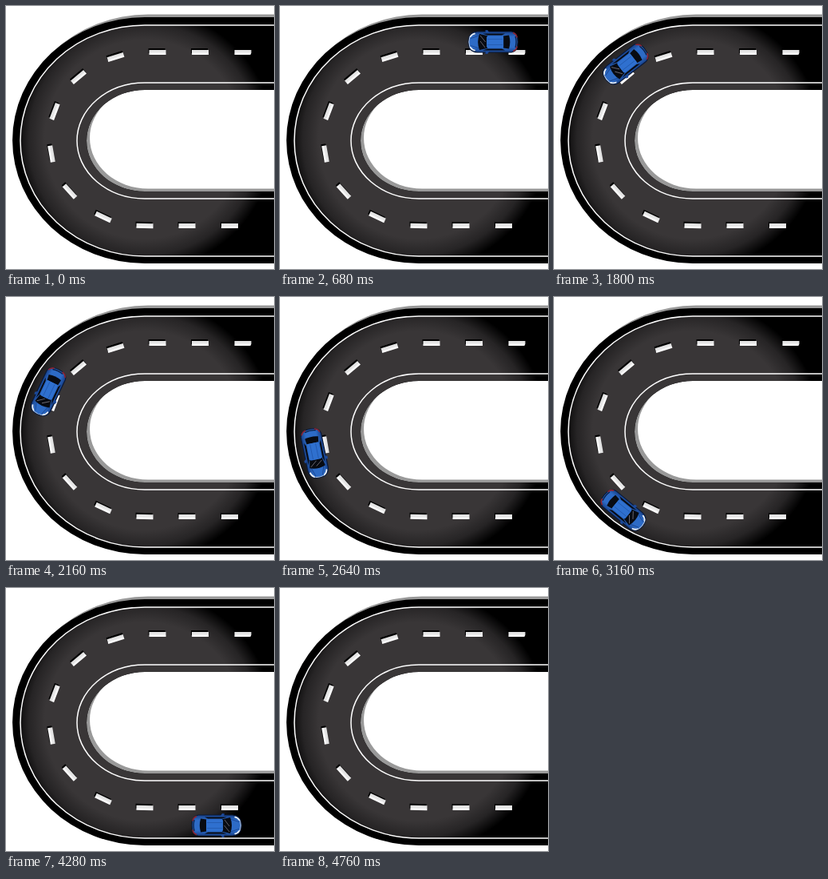
Recreate the animation shown at these times as an HTML page. Size 336 by 329 pixels, loop 4800 ms.

```html
<!DOCTYPE html>
<html lang="en">
<head>
<meta charset="utf-8">
<title>Car on a bend</title>
<style>
  html, body { margin: 0; width: 100%; height: 100%; overflow: hidden; background: #fff; }
  svg { position: absolute; left: 0; top: 0; overflow: visible; }
  .car {
    position: absolute; left: 0; top: 0; width: 0; height: 0;
    offset-path: path("M378.7 45H172A131 126 0 0 0 172 297H349.4");
    offset-rotate: auto;
    animation: drive 4.8s steps(120) infinite, show 4.8s step-end infinite;
  }
  @keyframes drive { from { offset-distance: 0%; } to { offset-distance: 100%; } }
  @keyframes show { 0% { visibility: visible; } 99.16%, 100% { visibility: hidden; } }
</style>
</head>
<body>
<svg width="336" height="329" viewBox="0 0 336 329">
  <defs>
    <radialGradient id="asphalt" gradientUnits="userSpaceOnUse" cx="173" cy="167" r="168">
      <stop offset=".74" stop-color="#393637"/>
      <stop offset=".86" stop-color="#262425"/>
      <stop offset=".97" stop-color="#000"/>
    </radialGradient>
    <path id="road" d="M340 14H174A166 154 0 0 0 174 322H340V232H174A73 63.5 0 0 1 174 105H340Z"/>
    <path id="lane" d="M340 24H174A156 144.5 0 0 0 174 313H340V232H174A73 63.5 0 0 1 174 105H340Z"/>
    <g id="dash">
      <rect x="-10.5" y="-3" width="21" height="6"/>
    </g>
    <g id="dashes">
      <use href="#dash" transform="translate(297 58)"/>
      <use href="#dash" transform="translate(243.5 58)"/>
      <use href="#dash" transform="translate(190 58)"/>
      <use href="#dash" transform="translate(137.5 64) rotate(-17)"/>
      <use href="#dash" transform="translate(91 89) rotate(-40)"/>
      <use href="#dash" transform="translate(61 132) rotate(-69)"/>
      <use href="#dash" transform="translate(57 185) rotate(80)"/>
      <use href="#dash" transform="translate(80 232) rotate(48)"/>
      <use href="#dash" transform="translate(122 264) rotate(25)"/>
      <use href="#dash" transform="translate(174 275) rotate(1)"/>
      <use href="#dash" transform="translate(227 275)"/>
      <use href="#dash" transform="translate(280.5 275)"/>
    </g>
    <linearGradient id="paint" x1="0" y1="0" x2="0" y2="1">
      <stop offset="0" stop-color="#e0e0e0"/>
      <stop offset=".45" stop-color="#e6e6e6"/>
      <stop offset=".8" stop-color="#fff"/>
    </linearGradient>
  </defs>
  <use href="#road" x="4" y="-3.5" fill="#999"/>
  <use href="#road"/>
  <use href="#lane" fill="url(#asphalt)"/>
  <g fill="none" stroke="#fff" stroke-width="1.5">
    <path d="M340 24H174A156 144.5 0 0 0 174 313H340"/>
    <path d="M340 96H174A85 72.5 0 0 0 174 241H340"/>
  </g>
  <use href="#dashes" x="-1" y="-2" fill="#000"/>
  <use href="#dashes" fill="url(#paint)"/>
  <path d="M306 61.5L309 57V62Z"/>
</svg>

<div class="car">
  <svg width="1" height="1">
    <defs>
      <linearGradient id="body" x1="0" y1="0" x2="0" y2="1">
        <stop offset="0" stop-color="#173f87"/>
        <stop offset=".25" stop-color="#2d6bc6"/>
        <stop offset=".75" stop-color="#2d6bc6"/>
        <stop offset="1" stop-color="#173f87"/>
      </linearGradient>
      <g id="side">
        <path d="M5 12L7 15L10 14.5L9 12Z" fill="#1c4a9c"/>
        <path d="M23 11.5Q29 10 30 5L28 6Q26 9 22 10Z" fill="#e8eef5"/>
        <path d="M-30 5.5Q-29.5 10 -25 11.6" fill="none" stroke="#8d2430" stroke-width="1.6"/>
        <path d="M-15 10.6L-11 8.6H7L13 10.6Z" fill="#080b12"/>
        <path d="M17 8L28 4.5" stroke="#1a4690" stroke-width=".9"/>
      </g>
    </defs>
    <path d="M-31 0Q-31 -12 -23 -13H20Q31 -12 31 0Q31 12 20 13H-23Q-31 12 -31 0Z"
          fill="url(#body)" stroke="#0b1a38" stroke-width="1.2"/>
    <path d="M-28 -7Q-30 0 -28 7" fill="none" stroke="#0d2148" stroke-width="1.4"/>
    <use href="#side"/>
    <use href="#side" transform="scale(1 -1)"/>
    <path d="M-20 -8.5L-13 -7.5V7.5L-20 8.5Q-22.5 0 -20 -8.5Z" fill="#080b12"/>
    <path d="M7 -7.8L17 -10Q21 0 17 10L7 7.8Q9 0 7 -7.8Z" fill="#080b12"/>
    <path d="M10 -7L16 1M9.5 0L16 8" stroke="#6b6870" stroke-width=".9"/>
    <rect x="-13" y="-7.6" width="21" height="15.2" rx="2" fill="#2f70cf"/>
    <path d="M-12 -3.5H7M-12 3.5H7" stroke="#2258ac" stroke-width=".8"/>
    <path d="M29.5 -5Q31 0 29.5 5" fill="none" stroke="#b9c8de" stroke-width="1"/>
  </svg>
</div>
</body>
</html>
```
